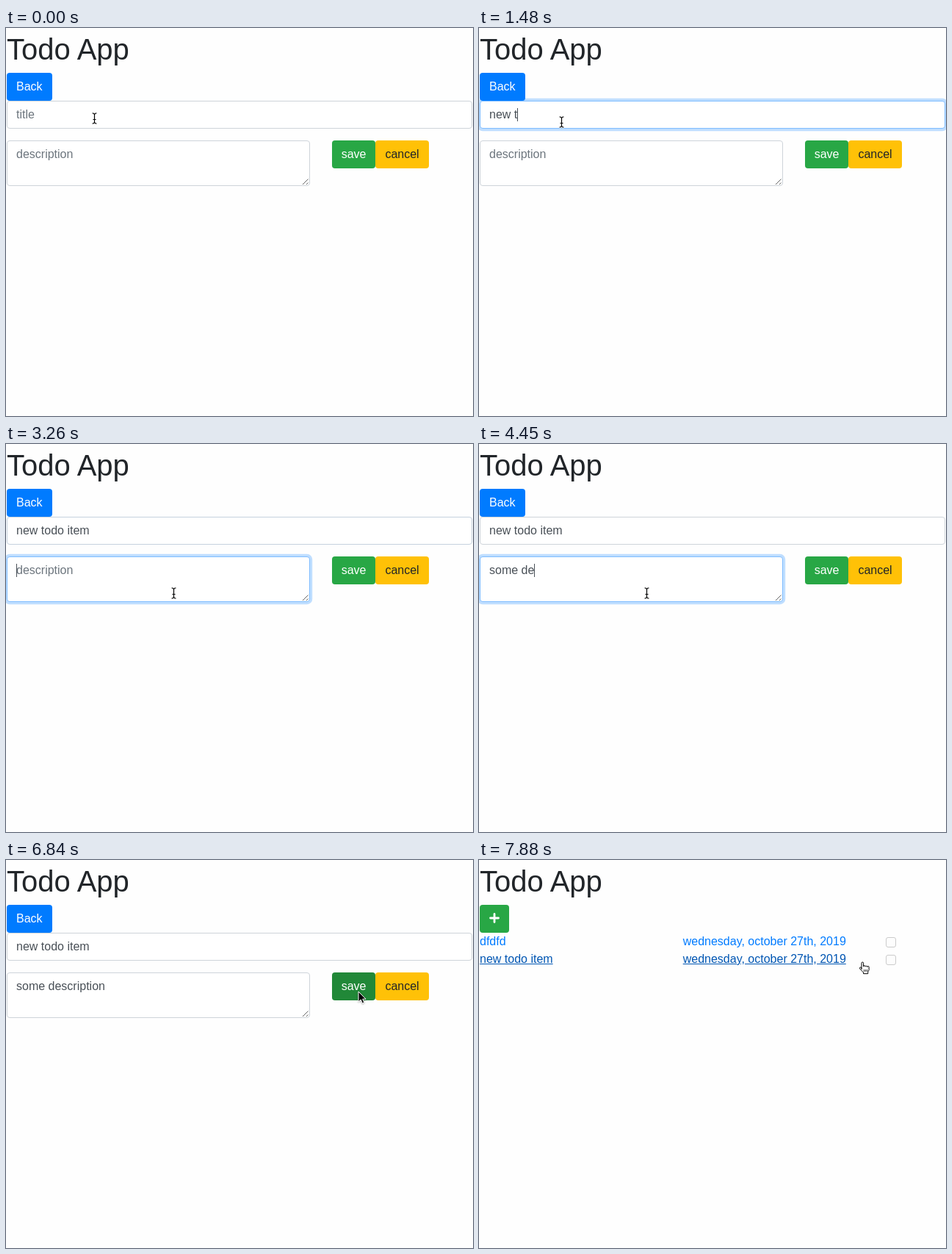
An HTML page for the animation above (8000 ms loop, 636 by 528 pixels).

```html
<!DOCTYPE html>
<html lang="en">
<head>
<meta charset="utf-8">
<title>Todo App</title>
<style>
* { box-sizing: border-box; }
html, body { margin: 0; width: 100%; height: 100%; overflow: hidden; }
body { position: relative; background: #fefefe; color: #212529; font: 16px/24px "Liberation Sans", Arial, sans-serif; white-space: pre; }
h1, .btn, .field, .link, .box, #cursor { position: absolute; margin: 0; }
h1 { left: 1px; top: 5px; font-weight: 400; font-size: 40px; line-height: 48px; }
.btn { height: 38px; padding: 7px 13px; border-radius: 4px; color: #fff; background: #28a745; }
.field { left: 1px; padding: 6px 12px; border: 1px solid #ced4da; border-radius: 4px; background: #fff; color: #495057; }
.hint { color: #6c757d; }
.caret { position: absolute; width: 1px; height: 18px; margin-top: 3px; background: #495057; }
.grip { position: absolute; right: 0; bottom: 0; width: 10px; height: 10px; }
.link { color: #007bff; }
.link.hover { color: #0056b3; text-decoration: underline; }
.box { left: 554px; width: 14px; height: 14px; border: 1px solid #cbcbcb; border-radius: 3px; background: #fdfdfd; }
#cursor { left: 0; top: 0; width: 636px; height: 528px; }
</style>
</head>
<body>
<h1>Todo App</h1>

<div id="form">
  <div class="btn" style="left:1px;top:61px;background:#007bff">Back</div>
  <div class="field" id="title" style="top:99px;width:634px;height:38px"><span class="value"></span><span class="caret"></span><span class="hint">title</span></div>
  <div class="field" id="desc" style="top:153px;width:413px;height:62px"><span class="value"></span><span class="caret"></span><span class="hint">description</span><svg class="grip" viewBox="0 0 10 10"><path d="M1 9 8.500 1.500M6 9 8.500 6.500" stroke="#666" fill="none"/></svg></div>
  <div class="btn" id="save" style="left:443.700px;top:153px">save</div>
  <div class="btn" style="left:503.400px;top:153px;background:#ffc107;color:#212529">cancel</div>
</div>

<div id="list">
  <div class="btn" style="left:1px;top:61px;width:40px"></div>
  <svg style="position:absolute;left:14px;top:72px" width="14" height="14"><path d="M7 1.500v11M1.500 7h11" stroke="#fff" stroke-width="2.800" stroke-linecap="round"/></svg>
  <div class="link" style="left:1px;top:99px">dfdfd</div>
  <div class="link" style="left:277.700px;top:99px">wednesday, october 27th, 2019</div>
  <div class="box" style="top:105px"></div>
  <div class="link row" style="left:1px;top:123px">new todo item</div>
  <div class="link row" style="left:277.700px;top:123px">wednesday, october 27th, 2019</div>
  <div class="box" style="top:129px"></div>
</div>

<svg id="cursor" viewBox="0 0 636 528">
  <g id="beam" fill="none">
    <path id="bar" d="M-3-7H-1.500L0-5.500 1.500-7H3M0-5.500V5.500M-3 7H-1.500L0 5.500 1.500 7H3M-2 1.500H2" stroke="#fff" stroke-width="2.600"/>
    <use href="#bar"/>
    <path d="M-3-7H-1.500L0-5.500 1.500-7H3M0-5.500V5.500M-3 7H-1.500L0 5.500 1.500 7H3M-2 1.500H2" stroke="#000" stroke-width="1.200"/>
  </g>
  <path id="arrow" d="M0 0V14L3.200 11 5.300 16 7.800 15 5.700 10.200H10Z" stroke="#fff" style="filter:drop-shadow(0 1px 1px #0005)"/>
  <g id="hand" stroke="#000" stroke-linejoin="round">
    <path d="M3.500 10V1.800a1.300 1.300 0 0 1 2.600 0V6.500a1.300 1.200 0 0 1 2.600 0 1.300 1.200 0 0 1 2.500.5 1.200 1.200 0 0 1 2.400.6V11l-1.400 3v2.200H6V14.500L1 9.300a1.200 1.200 0 0 1 1.700-1.600L3.500 8.600Z" fill="#fff"/>
    <path d="M7 10.500v3M9 10.500v3M11 10.500v3" stroke-width=".8"/>
  </g>
</svg>

<script>
const LOOP = 8000;
const $ = id => document.getElementById(id);

// Each track is a list of [start time, ...state]; a state holds until the next.
const fields = {
  title: {
    text: "new todo item",
    typed: [[0, 0], [740, 1], [890, 2], [1030, 3], [1180, 4], [1480, 5], [1630, 6], [1780, 8], [1930, 10], [2070, 11], [2220, 13]],
    focus: [[0, 0], [140, .6], [290, 1], [3110, .4], [3260, .1], [3410, 0]],
    caret: [[0, 0], [140, 1], [2660, 0]]
  },
  desc: {
    text: "some description",
    typed: [[0, 0], [4000, 1], [4150, 3], [4300, 5], [4450, 7], [4750, 8], [4900, 9], [5050, 11], [5200, 13], [5350, 15], [5500, 16]],
    focus: [[0, 0], [3110, .7], [3260, 1], [6690, .3], [6840, 0]],
    caret: [[0, 0], [3110, 1], [3710, 0], [4000, 1], [6100, 0]]
  }
};
const pointer = [
  [0, "beam", 120.5, 123], [140, "beam", 114.5, 127], [290, "beam", 112.5, 128],
  [2370, "beam", 188.5, 185], [2660, "beam", 212.5, 219], [2810, "beam", 226.5, 229],
  [2960, "beam", 229.5, 210], [3110, "beam", 228.5, 203],
  [5800, "beam", 235.5, 202], [5950, "beam", 265.5, 205], [6100, "beam", 320.5, 213],
  [6250, "beam", 385.5, 218], [6400, "arrow", 440, 206], [6540, "arrow", 470, 188],
  [6690, "arrow", 479, 181], [6840, "arrow", 480, 179],
  [7440, "arrow", 483, 186], [7590, "arrow", 500, 172], [7740, "arrow", 516, 151],
  [7880, "hand", 517.5, 138.5]
];

const at = (track, t) => track.findLast(key => key[0] <= t).slice(1);
const show = (el, on) => el.style.display = on ? "" : "none";

function drawField(id, t) {
  const { text, typed, focus, caret } = fields[id];
  const el = $(id), [count] = at(typed, t), [glow] = at(focus, t);
  el.querySelector(".value").textContent = text.slice(0, count);
  show(el.querySelector(".hint"), !count);
  show(el.querySelector(".caret"), at(caret, t)[0]);
  el.style.borderColor = `color-mix(in srgb, #80bdff ${glow * 100}%, #ced4da)`;
  el.style.boxShadow = `0 0 0 ${3.2 * glow}px rgba(0,123,255,${.25 * glow})`;
}

function draw(t) {
  const saved = t >= 6990;
  show($("form"), !saved);
  show($("list"), saved);
  drawField("title", t);
  drawField("desc", t);

  const [kind, x, y] = at(pointer, t);
  for (const id of ["beam", "arrow", "hand"]) show($(id), id === kind);
  $(kind).setAttribute("transform", `translate(${x} ${y})`);
  const overSave = kind === "arrow" && x > 444 && x < 503 && y > 153 && y < 191;
  $("save").style.background = overSave ? "#218838" : "";
  for (const el of document.querySelectorAll(".row")) el.classList.toggle("hover", kind === "hand");
}

const start = performance.now();
function tick() {
  draw((performance.now() - start) % LOOP);
  requestAnimationFrame(tick);
}
tick();
</script>
</body>
</html>
```
